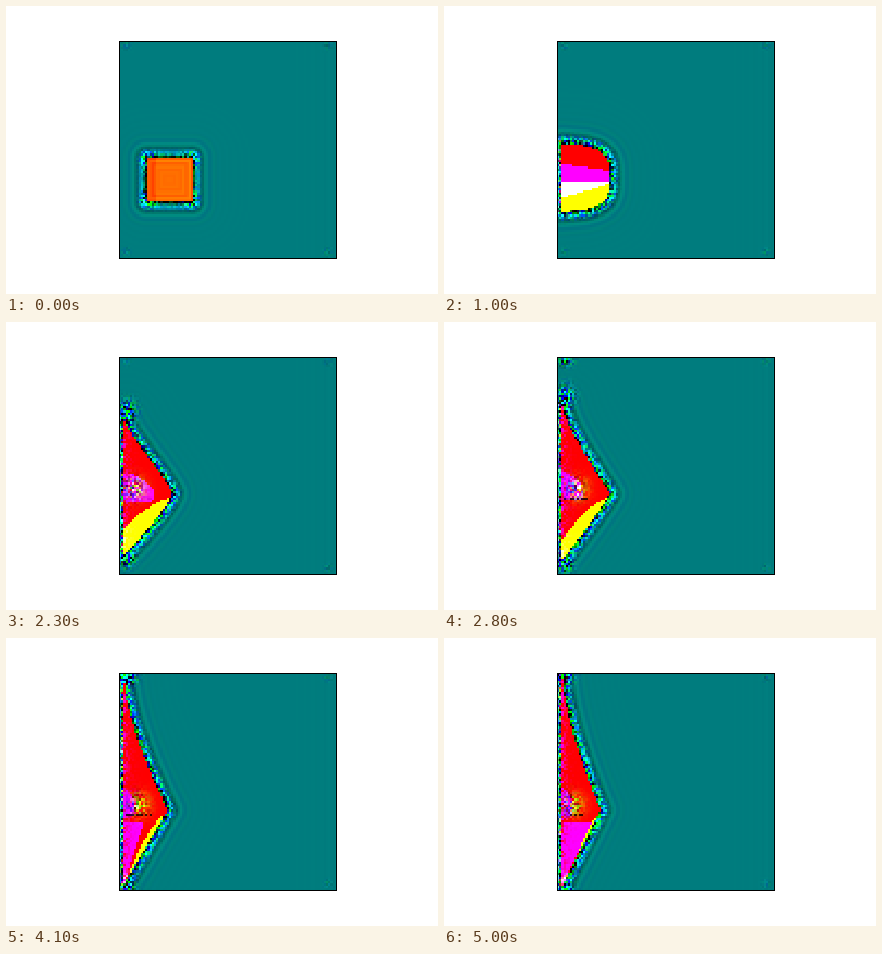
Write a matplotlib script that moves like this. It is 432 px wide and 288 px high and loops after 5100 ms.

```python
import numpy as np
import matplotlib.pyplot as plt
from matplotlib.animation import FuncAnimation
from matplotlib.path import Path

W, H, DPI = 432, 288, 72
FRAMES, STEP = 51, 100
N = 100                                  # cells per side
SIDE, LEFT, TOP = 217.44, 112.68, 34.56  # plot box in stage pixels
HIT = 10                                 # step at which the block meets the wall

axis = (np.arange(N) + 0.5) * SIDE / N
X, Y = np.meshgrid(LEFT + axis, TOP + axis)
CELLS = np.column_stack([X.ravel(), Y.ravel()])

rng = np.random.default_rng(7)
PHASE = rng.uniform(0, 2 * np.pi, (3, N, N))
RATE = rng.uniform(0.3, 0.9, (3, N, N))


def ramp(t, start, end):
    return float(np.clip((t - start) / (end - start), 0, 1))


def blob(cx, cy, rx, ry):
    return np.exp(-((X - cx) / rx) ** 2 - ((Y - cy) / ry) ** 2)


def wave(d, length, shift=0.0):
    return np.cos(2 * np.pi * d / length + shift)


class Body:
    """The block: it slides to the wall, then spreads along it."""

    def __init__(self, t):
        after = max(t - HIT, 0)
        self.left = max(140 - 2.2 * t, 118)
        self.tip = max(186 - 2.3 * t, 166 - 0.011 * (t - 20) ** 2)
        self.mid = max(174 - 0.2 * t, 172)
        start = 22 + 1.2 * min(t, HIT)
        self.up = min(start + 3 * after, 133)
        self.down = start + 44 * (1 - np.exp(-after / 14))
        self.bulge = 1 + 3 * np.exp(-after / 5)
        self.taper = 1.5 - np.exp(-after / 9) if after else 0.05 * t

        s = np.linspace(-1, 1, 33)
        y = self.mid + s * np.where(s < 0, self.up, self.down)
        edge = np.column_stack([self.edge(y), y])
        self.top, self.foot = y[0], y[-1]
        self.outline = np.vstack([(self.left, y[0]), edge, (self.left, y[-1])])
        self.mask = Path(self.outline).contains_points(CELLS).reshape(N, N)
        self.d = self.distance()

    def edge(self, y):
        """Right edge at height y."""
        above = y < self.mid
        s = abs(y - self.mid) / np.where(above, self.up, self.down)
        taper = np.where(above, self.taper, min(self.taper, 1))
        width = np.clip(1 - s ** self.bulge, 0, 1) ** taper
        return self.left + (self.tip - self.left) * width

    def distance(self):
        best = np.full((N, N), 1e9)
        for (ax, ay), (bx, by) in zip(self.outline, np.roll(self.outline, -1, 0)):
            dx, dy = bx - ax, by - ay
            size = max(dx * dx + dy * dy, 1e-9)
            u = np.clip(((X - ax) * dx + (Y - ay) * dy) / size, 0, 1)
            best = np.minimum(best, np.hypot(X - ax - u * dx, Y - ay - u * dy))
        return best


def surroundings(t, body, noise):
    """Still water with ripples and speckles around the body."""
    d = body.d
    near, far = np.exp(-d / 5), np.exp(-d / 10)
    corners = sum(blob(x, y, 9, 9) for x in (body.left, body.tip)
                  for y in (body.top, body.foot))
    late = ramp(t, 0, 8)
    speckle = np.exp(-(d / 6) ** 2) * ((0.15 + corners) * (1 - late) + 0.75 * late)

    # spray along the wall and faint marks in the box corners
    hit = ramp(t, HIT, 16)
    spray = 0.8 * hit * blob(121, body.top - 9, 8, 10)
    spray += 0.8 * hit * blob(121, body.foot + 5, 7, 6)
    spray += 0.4 * ramp(t, 23, 28) * blob(121, 40, 8, 5)
    for x in (120, 321):
        for y in (40, 246):
            spray += 0.1 * blob(x, y, 4, 4)
    speckle = speckle + spray

    wall = ramp(t, 7, HIT) * (X < body.left) * np.exp(-(d / 5) ** 2)
    rim = 0.015 * np.exp(-(LEFT + SIDE - X) / 10) * wave(LEFT + SIDE - X, 8)
    r = speckle * (0.7 * noise[0] - 0.5) + 0.6 * wall * (noise[0] + 0.3)
    g = 0.49 - near * 0.55 * wave(d, 9) + speckle * noise[1]
    b = 0.495 - near * 0.65 * wave(d, 11) + speckle * noise[2]
    g += 0.09 * far * wave(d, 7) + rim
    b += 0.06 * far * wave(d, 7, 1) + rim
    return np.stack([r, g, b], axis=-1)


def fluid(t, body, noise):
    """Colours inside the body: green falls, blue is pushed off the wall."""
    after = max(t - HIT, 0)
    u = np.clip((X - body.left) / (body.tip - body.left), 0, 1)

    if t < HIT:
        calm = 1 - t / HIT
        g = 0.5 - 0.07 * calm + 0.001 * t * t * (Y - 176)
        g += calm * (0.14 * np.exp(-body.d / 7) * wave(body.d, 6, 3.1)
                     - 0.12 * (X < 149))
    else:
        g = (Y > 176 + 2.3 * after * (1 - u) ** 1.6).astype(float)

    reach = max(min((t - 3) / 7, 1 - 0.03 * after), 0.25 * ramp(t, 3, 5), 1e-3)
    crest = max(158 - after, 150) + 14 * ramp(t, HIT, 18) * (u / reach) ** 2 + 7 * u
    trough = 178 + 14 * (1 - u) * (1 - ramp(t, HIT, 26))
    blue = (u < reach) & (Y > crest) & (Y < trough)
    share = (X - body.left) / (body.edge(Y) - body.left + 1e-6)
    blue |= (Y > 184) & (share < ramp(t, 28, 52)) & (g < 0.5)
    b = blue.astype(float)
    r = np.ones((N, N))

    # churned core beside the wall, streaks on it and a pale foot
    cx = 121 + 8 * ramp(t, 18, 28) - 4 * ramp(t, 41, 50)
    churn = ramp(t, 12, 18) * blob(cx, 167, 11, 11)
    lean = (X - cx) / 12
    streak = ramp(t, HIT, 25) * np.exp(-(X - body.left) / 4)
    foot = ramp(t, 29, 35) * blob(122, 242, 7, 6)
    r = r - churn * (0.2 + 0.6 * noise[0])
    g = g + churn * (0.25 + lean + 0.8 * noise[1]) + foot * (0.4 + 0.8 * noise[1])
    b = b + churn * (0.8 * noise[2] - lean) + foot * (0.9 + 0.5 * noise[2])
    b = b + 0.9 * streak * noise[2]
    rgb = np.stack([r, g, b], axis=-1)

    seam = (abs(Y - 177) < 1.5) & (X > 119) & (X < 145) & (noise[0] < 0.5)
    rgb[seam] *= 1 - 0.8 * ramp(t, 22, 28)
    return rgb


def picture(t):
    noise = np.sin(PHASE + RATE * t)
    body = Body(t)
    inner = fluid(t, body, noise)
    outer = surroundings(t, body, noise)
    return np.clip(np.where(body.mask[..., None], inner, outer), 0, 1)


fig = plt.figure(figsize=(W / DPI, H / DPI), dpi=DPI, facecolor="white")
ax = fig.add_axes([LEFT / W, 1 - (TOP + SIDE) / H, SIDE / W, SIDE / H])
ax.set_xticks([])
ax.set_yticks([])
for spine in ax.spines.values():
    spine.set_linewidth(1)
image = ax.imshow(picture(0), interpolation="nearest", aspect="auto")


def draw(frame):
    image.set_data(picture(frame))
    return [image]


anim = FuncAnimation(fig, draw, frames=FRAMES, interval=STEP, repeat=True)
plt.show()
```
